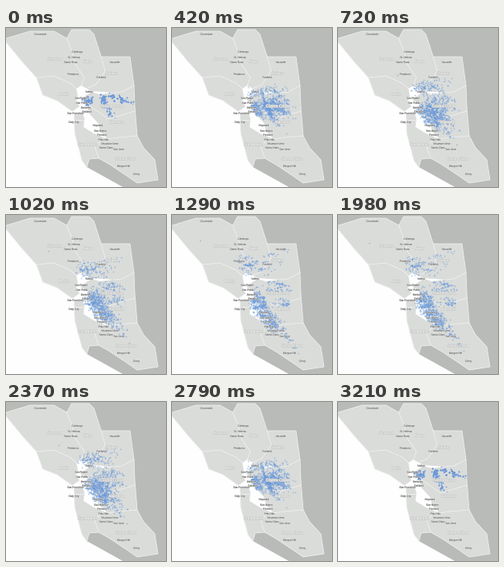
Recreate the animation shown at these times as a matplotlib script. Size 200 px wide and 199 px high, loop 3.36 s.

```python
import numpy as np
import matplotlib as mpl
import matplotlib.pyplot as plt
from matplotlib.animation import FuncAnimation
from matplotlib.patches import Polygon
from matplotlib.patheffects import withStroke

W, H, DPI = 200, 199, 100
STEP, STEPS, FRAMES = 30, 50, 112
TURN = 58  # step at which the way back starts
SEA, MAINLAND, LAND, EDGE = "#fefefe", "#b9bbb9", "#dadcda", "#f0f1f0"
DOT = "#6b9ad8"
PT = 72 / DPI
COMMUTERS = 950

mpl.rcParams.update({"font.family": "Liberation Sans", "text.hinting": "none"})
rng = np.random.default_rng(12)

# Key points, in stage pixels
COAST = [(-3, 14), (20, 42), (38, 62), (46, 84), (64, 91), (85, 106),
         (86, 132), (95, 166), (101, 174)]
SOUTH_COAST = [(128, 189), (146, 199), (150, 205)]
INLAND = [(104, 164), (116, 163), (130, 171), (151, 185), (164, 194), (190, 190),
          (186, 165), (172, 150), (164, 135), (161, 98), (160, 72), (155, 36),
          (119, 36), (110, 8), (104, 2), (82, 2), (76, 13), (60, 4), (30, 4)]
BAY = [(78, 108), (92, 98), (87, 92), (90, 87), (88, 76), (94, 72), (107, 79),
       (135, 81), (117, 83), (107, 80), (99, 85), (93, 90), (102, 96), (103, 106),
       (115, 119), (118, 130), (127, 139), (110, 132), (97, 124), (98, 113),
       (95, 105), (87, 106)]
BORDERS = [
    [(76, 13), (83, 31), (87, 46), (98, 62), (94, 72)],
    [(119, 36), (124, 54), (112, 71), (102, 75)],
    [(38, 62), (60, 60), (80, 69), (88, 76)],
    [(135, 81), (145, 80), (160, 72)],
    [(102, 96), (117, 106), (128, 114), (161, 104)],
    [(127, 139), (140, 137), (164, 135)],
    [(86, 115), (98, 115)],
    [(121, 137), (111, 149), (116, 163)],
]

COUNTY_LABELS = [("Sonoma", 61, 39), ("Napa", 102, 42), ("Solano", 132, 57),
                 ("Marin", 72, 83), ("Contra Costa", 132, 98), ("Alameda", 138, 118),
                 ("San Mateo", 102, 146), ("Santa Clara", 150, 164)]

CITY_LABELS = [("Cloverdale", 43, 8), ("Calistoga", 89, 30), ("St. Helena", 85, 37),
               ("Santa Rosa", 81, 43), ("Vacaville", 136, 43), ("Petaluma", 84, 58),
               ("Fairfield", 119, 62), ("Vallejo", 104, 80), ("San Rafael", 94, 88),
               ("San Pablo", 95, 94), ("Berkeley", 100, 100), ("Oakland", 101, 105),
               ("San Francisco", 87, 107), ("Daly City", 85, 118),
               ("Hayward", 115, 122), ("San Mateo", 118, 129), ("Fremont", 120, 134),
               ("Palo Alto", 122, 140), ("Mountain View", 130, 145),
               ("Santa Clara", 125, 150), ("San Jose", 141, 152),
               ("Morgan Hill", 147, 173), ("Gilroy", 163, 183)]


def along(path, count, spread):
    """Scatter count tracts around a path of key points."""
    x, y = np.array(path, float).T
    at = rng.uniform(0, len(path) - 1, count)
    knots = np.arange(len(path))
    line = np.column_stack([np.interp(at, knots, x), np.interp(at, knots, y)])
    return line + rng.normal(size=(count, 2)).clip(-1.8, 1.8) * spread


def pick(tracts):
    """Choose a tract for each commuter; some tracts are far busier."""
    share = rng.exponential(size=len(tracts)) + 0.2
    return tracts[rng.choice(len(tracts), COMMUTERS, p=share / share.sum())]


home = pick(np.vstack([
    along([(98, 91), (106, 91)], 34, 2.6),
    along([(119, 87), (124, 98), (134, 111)], 42, 2.4),
    along([(118, 86), (134, 86), (156, 92)], 44, 2.6),
]))
job = pick(np.vstack([
    along([(98, 104), (99, 117), (110, 132), (124, 146), (140, 153)], 210, 3),
    along([(102, 95), (108, 110), (118, 126), (134, 142)], 150, 3),
    along([(128, 112), (150, 113)], 35, 3),
    along([(112, 88), (150, 90)], 40, 4),
    along([(80, 52), (104, 62), (134, 48)], 65, 7),
    along([(145, 160), (162, 181)], 14, 2),
]))
# The longest trips
home[:2] = (124, 94), (136, 112)
job[:2] = (20, 22), (162, 183)

fig = plt.figure(figsize=(W / DPI, H / DPI), dpi=DPI, facecolor=SEA)
ax = fig.add_axes([0, 0, 1, 1])
ax.set(xlim=(0, W), ylim=(H, 0))
ax.axis("off")


def area(points, fill, edge="none"):
    ax.add_patch(Polygon(points, fc=fill, ec=edge, lw=0.8 * PT, joinstyle="round"))


def label(text, x, y, size, color, halo, width):
    ax.text(x, y, text, size=size * PT, color=color, ha="center", va="center",
            zorder=4, path_effects=[withStroke(linewidth=width * PT, foreground=halo)])


area(COAST + SOUTH_COAST + [(205, 205), (205, -5), (-5, -5)], MAINLAND)
area(COAST + INLAND, LAND, EDGE)
for border in BORDERS:
    ax.plot(*zip(*border), color=EDGE, lw=0.8 * PT)
area(BAY, SEA)

dots, = ax.plot([], [], "o", ms=1.7 * PT, color=DOT, mew=0, alpha=0.55, zorder=3)

for name in COUNTY_LABELS:
    label(*name, 5, "#ffffff", "#c3c5c3", 1)
for name in CITY_LABELS:
    label(*name, 3.2, "#222222", "#e8e9e8", 0.6)


def draw(i):
    step = min(i, STEPS) if i < TURN else max(STEPS - 1 - (i - TURN), 0)
    dots.set_data(*(home + (job - home) * step / STEPS).T)
    return dots,


anim = FuncAnimation(fig, draw, frames=FRAMES, interval=STEP, repeat=True,
                     repeat_delay=0, blit=False)
plt.show()
```
